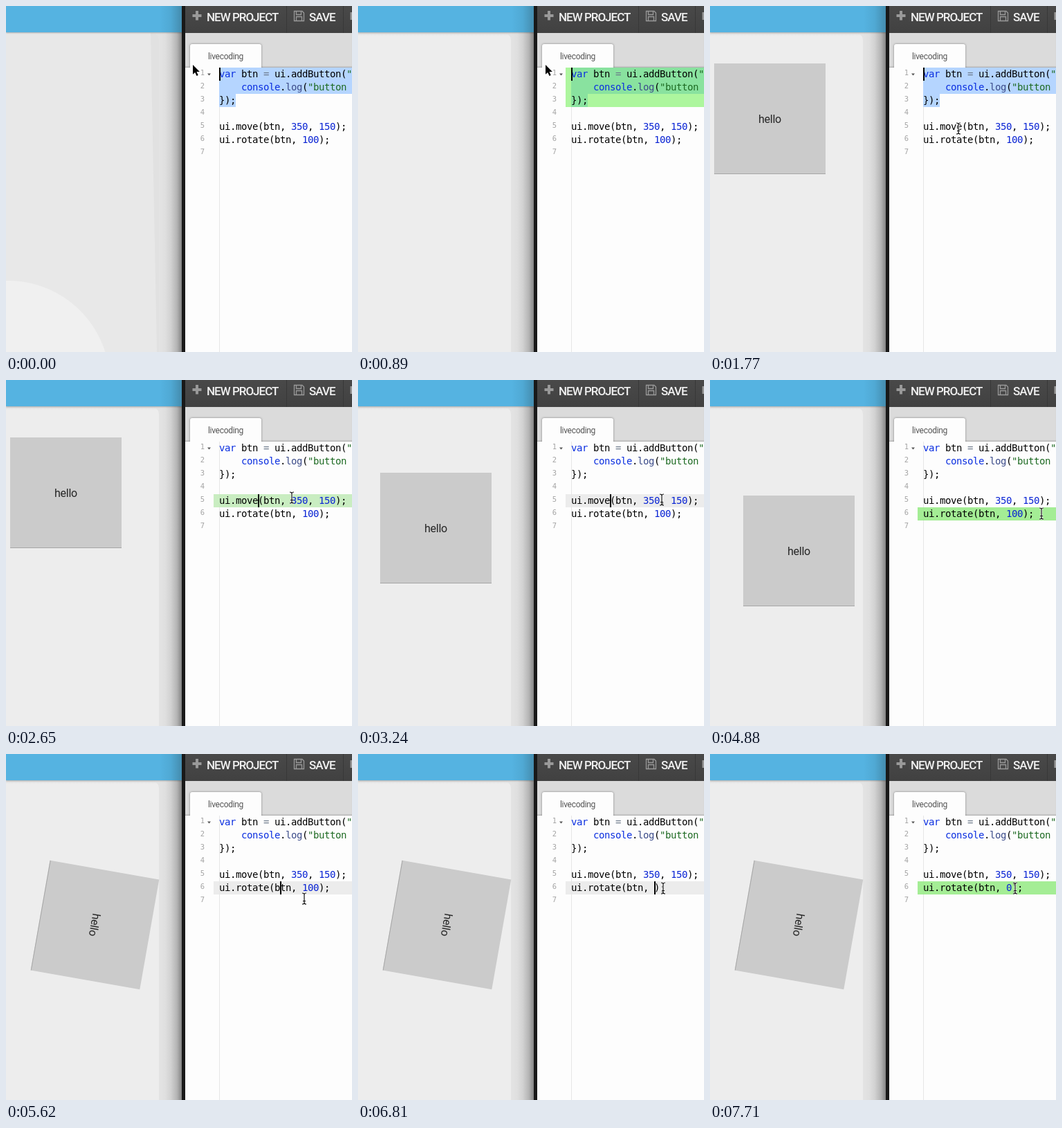
Animation, 500 px wide and 500 px high, one loop 8 s. Source, as an HTML page:

```html
<!DOCTYPE html>
<html lang="en">
<head>
<meta charset="utf-8">
<title>Live coding</title>
<style>
  html, body { margin: 0; width: 100%; height: 100%; overflow: hidden; background: #fdfdfd; }
  #stage { position: relative; width: 500px; height: 500px; overflow: hidden; }
  #stage div, #stage svg { position: absolute; }

  /* phone screen */
  #phone { left: 0; top: 0; width: 254px; height: 500px; overflow: hidden;
    background: linear-gradient(90deg, #e3e3e3 222px, #dfdfdf 230px, #d2d2d2 238px, #b4b4b4 247px, #858585 254px); }
  #panel { left: 0; top: 39px; width: 221px; height: 461px; border-radius: 0 10px 0 0;
    background: linear-gradient(#dfdfdf, #ededed 4px); }
  #panel.early { background: #e1e1e1; }
  #glow { inset: 0; clip-path: polygon(0 0, 209px 0, 218px 100%, 0 100%);
    background: radial-gradient(circle at 3px 505px, #f0f0f0 146.5px, #e8e8e8 147.5px); }
  #bar { left: 0; top: 0; width: 254px; height: 38px; box-shadow: 0 1px 2px rgba(0, 0, 0, .25);
    background: linear-gradient(90deg, #55b3e1 222px, #50a9d4 238px, #448cae 254px); }
  #btn { left: 0; top: 0; width: 161px; height: 160px; box-sizing: border-box;
    background: #cbcbcb; border-bottom: 1.5px solid #a6a6a6;
    font: 16px/161px Roboto, sans-serif; letter-spacing: -.25px; color: #262626; text-align: center; }
  #edge { left: 254px; top: 0; width: 5px; height: 500px; background: #191919; }

  /* editor chrome */
  #tools { left: 259px; top: 0; width: 241px; height: 39px; background: linear-gradient(#494949, #414141); }
  #tools div { top: 6px; font: 500 17px/20px Roboto, sans-serif; letter-spacing: -1px; color: #f2f2f2; white-space: pre; }
  #tools i { position: absolute; top: 0; width: 1px; height: 39px; background: #383838; }
  #tabs { left: 259px; top: 39px; width: 241px; height: 50px; overflow: hidden; background: #dbdbdb;
    box-shadow: inset 0 -2px 2px -1px rgba(0, 0, 0, .25); }
  #tab { left: 7px; top: 16px; width: 103px; height: 40px; border-radius: 3px 3px 0 0; background: #fdfdfd;
    box-shadow: 0 0 3px #777; font: 12px/37px Roboto, sans-serif; letter-spacing: -.3px; color: #555; text-align: center; }

  /* code */
  #code { left: 259px; top: 89px; width: 241px; height: 411px; overflow: hidden; background: #fdfdfd; }
  #guide { left: 49px; top: 0; width: 1px; height: 411px; background: #e6e6e6; }
  .row { left: 49px; height: 19px; white-space: pre; color: #000;
    font: 14px/19px "DejaVu Sans Mono", monospace; letter-spacing: calc(8px - .60205em); }
  .num { left: 0; width: 28px; text-align: right; color: #a4a4a4; font: 10.5px/15px "DejaVu Sans Mono", monospace; }
  .sel { background: #b5d5ff; height: 19px; }
  #active { left: 41px; width: 200px; height: 19px; background: #ececec; }
  #flash { left: 41px; width: 200px; background: rgb(95, 239, 65); }
  #caret { width: 2px; height: 19px; background: #000; }
  .k { color: #0a2ee0; } .n { color: #0a24d4; } .o { color: #687687; }
  .f { color: #3c4c8a; } .s { color: #1d6a22; }
  #arrow, #beam { left: 0; top: 0; overflow: visible; }
</style>
</head>
<body>
<div id="stage">
  <div id="phone">
    <div id="panel"><div id="glow"></div></div>
    <div id="bar"></div>
    <div id="btn">hello</div>
  </div>
  <div id="edge"></div>

  <div id="tools">
    <svg width="241" height="39" fill="none" stroke="#999">
      <path d="M17 7V20.500M10.500 14H23.500" stroke-width="4"/>
      <path d="M157.500 7.500H169L171.500 10V21.500H157.500ZM160.500 7.500V12.500H167.500V7.500M160.500 21.500V15.500H168.500V21.500" stroke-width="1.300"/>
      <path d="M240 9V20" stroke-width="3"/>
    </svg>
    <div style="left:31px">NEW PROJECT</div>
    <div style="left:179px">SAVE</div>
    <i style="left:146px"></i><i style="left:228px"></i>
  </div>
  <div id="tabs"><div id="tab">livecoding</div></div>

  <div id="code">
    <div id="active"></div>
    <div id="guide"></div>
    <div id="sels">
      <div class="sel" style="left:49px;top:0;width:192px;height:38px"></div>
      <div class="sel" style="left:49px;top:38px;width:24px"></div>
    </div>
    <div id="pick" class="sel" style="left:169px;top:95px;width:24px"></div>
    <div id="flash"></div>
    <div id="rows"></div>
    <svg width="40" height="19"><path d="M32 8.500H37L34.500 11.500Z" fill="#555"/></svg>
    <div id="caret"></div>
  </div>

  <svg id="arrow" width="11" height="16.500" viewBox="0 0 10 15"><path d="M0 0V12.500L2.900 9.900L5 14.500L7 13.600L5 9.200H9Z" stroke="#fff" stroke-width="1.600" paint-order="stroke"/></svg>
  <svg id="beam" width="8" height="17" fill="none">
    <defs><path id="bar-shape" d="M-3 -8Q0 -8 0 -6Q0 -8 3 -8M0 -6V6M-3 8Q0 8 0 6Q0 8 3 8M-2 3.500H2"/></defs>
    <use href="#bar-shape" stroke="#fff" stroke-width="2.600"/>
    <use href="#bar-shape" stroke="#111" stroke-width="1.200"/>
  </svg>
</div>

<script>
const $ = id => document.getElementById(id);
const LOOP = 8000, TICKS = 54, ROW = 19, COL = 8;

const lines = [
  '<span class="k">var</span> btn <span class="o">=</span> ui.addButton(<span class="s">"</span>',
  '    <span class="k">console</span>.<span class="f">log</span>(<span class="s">"button </span>',
  '});',
  '',
  'ui.move(btn, <span class="n">350</span>, <span class="n">150</span>);',
  'ui.rotate(btn, <span class="n" id="angle">100</span>);',
  ''
];
$('rows').innerHTML = lines.map((html, i) =>
  `<div class="num" style="top:${i * ROW}px">${i + 1}</div>` +
  `<div class="row" style="top:${i * ROW}px">${html}</div>`).join('');

// pointer path: tick, x, y
const path = [
  [0, 270, 85], [5, 270, 85], [6, 271, 85], [8, 284, 98], [12, 359, 177], [13, 363, 174],
  [14, 363, 174], [16, 366, 170], [19, 436, 170], [20, 436, 170], [22, 439, 173], [27, 397, 193],
  [30, 397, 193], [33, 479, 193], [34, 479, 193], [38, 431, 209], [42, 441, 194], [54, 441, 194]
];
// caret placements: tick, row, column
const carets = [[-3, 0, 0], [15, 4, 7], [28, 5, 11], [42, 5, 18], [46, 5, 15], [47, 5, 16]];
// evaluated code: tick, first row, row count
const runs = [[3, 0, 3], [18, 4, 1], [32, 5, 1], [51, 5, 1]];

const ease = p => .5 - .5 * Math.cos(Math.PI * Math.min(1, Math.max(0, p)));
const show = (id, on) => { $(id).style.visibility = on ? 'visible' : 'hidden'; };
const shift = (x, y) => `translate(${Math.round(x)}px, ${Math.round(y)}px)`;
const last = (list, n) => list.filter(e => e[0] <= n).pop();

function pointer(n) {
  const i = path.findIndex(p => p[0] > n);
  const [a, b] = [path[i - 1], path[i]];
  const p = (n - a[0]) / (b[0] - a[0]);
  return [a[1] + (b[1] - a[1]) * p, a[2] + (b[2] - a[2]) * p];
}

function draw(n) {
  $('panel').className = n < 3 ? 'early' : '';
  show('glow', n < 3);

  const move = ease((n - 20.86) / 2), turn = ease((n - 35) / 2);
  show('btn', n >= 7);
  $('btn').style.transform = `${shift(6 + 42 * move, 83 + 84 * move)} rotate(${100 * turn}deg)`;

  const [since, row, col] = last(carets, n);
  show('caret', Math.floor((n - since) / 3.42) % 2 === 0);
  $('caret').style.left = 49 + col * COL + 'px';
  $('caret').style.top = row * ROW + 'px';

  show('sels', n < 15);
  show('active', n >= 15);
  $('active').style.top = row * ROW + 'px';
  show('pick', n >= 42 && n < 46);
  $('angle').textContent = n < 46 ? '100' : n < 47 ? '' : '0';

  const run = last(runs, n), age = run ? n - run[0] : 9;
  show('flash', age < 4);
  if (run) {
    $('flash').style.top = run[1] * ROW + 'px';
    $('flash').style.height = run[2] * ROW + 'px';
    $('flash').style.opacity = age ? .5 : .25;
  }

  const [x, y] = pointer(n), inText = x >= 300;
  show('arrow', !inText);
  show('beam', inText);
  $(inText ? 'beam' : 'arrow').style.transform = shift(x, y);
}

// the screen refreshes at a fixed, slow rate
let start, shown = -1;
function tick(now) {
  start ??= now;
  const t = (now - start) % LOOP;
  const n = Math.min(TICKS - 1, Math.floor((t + 20) * TICKS / LOOP));
  if (n !== shown) draw(shown = n);
  requestAnimationFrame(tick);
}
draw(0);
requestAnimationFrame(tick);
</script>
</body>
</html>
```
